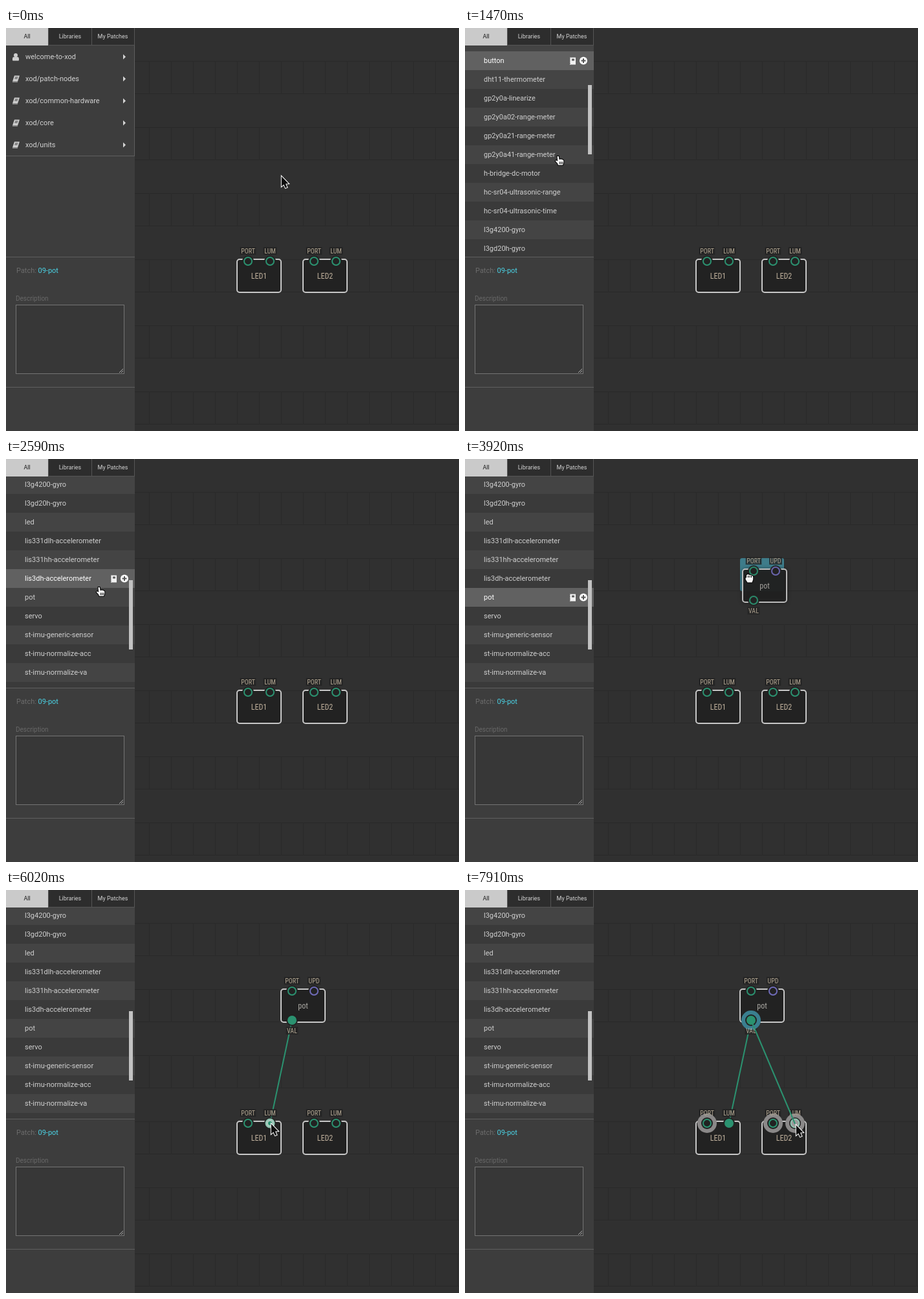
Animation, 700 px wide and 622 px high, one loop 8000 ms. Source, as an HTML page with a canvas:

```html
<!DOCTYPE html>
<html lang="en">
<head>
<meta charset="utf-8">
<title>Patch editor</title>
<style>
html, body { margin: 0; width: 100%; height: 100%; overflow: hidden; background: #303030; }
canvas { display: block; }
</style>
</head>
<body>
<canvas id="stage" width="700" height="622"></canvas>
<script>
const ctx = document.getElementById('stage').getContext('2d');
const LOOP = 8000, STEP = 70;
const GREEN = '#2b9270', PURPLE = '#6f6bb8', DARK = '#222222', LINE = '#5f5f5f';
const SANS = 'Roboto, sans-serif';
const NARROW = '"Roboto Condensed", Roboto, sans-serif';
const ITEMS = ['analog-input', 'analog-sensor', 'button', 'dht11-thermometer', 'gp2y0a-linearize',
  'gp2y0a02-range-meter', 'gp2y0a21-range-meter', 'gp2y0a41-range-meter', 'h-bridge-dc-motor',
  'hc-sr04-ultrasonic-range', 'hc-sr04-ultrasonic-time', 'l3g4200-gyro', 'l3gd20h-gyro', 'led',
  'lis331dlh-accelerometer', 'lis331hh-accelerometer', 'lis3dh-accelerometer', 'pot', 'servo',
  'st-imu-generic-sensor', 'st-imu-normalize-acc', 'st-imu-normalize-va', 'text-lcd-16x2',
  'thermometer-dht21', 'thermometer-tmp36'];
const POT = ITEMS.indexOf('pot'), BUTTON = ITEMS.indexOf('button');
const LIST_TOP = 27, LIST_END = 353, ITEMS_TOP = 129, ROW = 29;

// Moments of the interaction, in ms
const EXPAND = 770, DRAG = 3010, DROP = 4060, PICK1 = 5180, LINK1 = 6020, PICK2 = 7000;
const cursorPath = [
  [70, 425, 228], [630, 180, 118], [700, 180, 118], [1260, 144, 198], [2590, 144, 198],
  [2800, 143, 207], [2940, 143, 207], [3080, 142, 208], [3150, 142, 208], [3430, 226, 226],
  [3920, 437, 178], [4060, 437, 178], [4480, 484, 172], [4830, 471, 155], [5040, 450, 201],
  [5180, 450, 201], [5950, 409, 360], [6020, 409, 360], [6790, 452, 209], [6860, 450, 206],
  [7000, 450, 206], [7910, 511, 362]
];
const scrollPath = [[1260, 0], [1470, 151], [2450, 423]];
const thumbPath = [[0, 29], [151, 88], [423, 187]];

function follow(keys, t, soft = 0) {
  if (t <= keys[0][0]) return keys[0].slice(1);
  for (let i = 1; i < keys.length; i++) {
    const a = keys[i - 1], b = keys[i];
    if (t > b[0]) continue;
    const u = (t - a[0]) / (b[0] - a[0]);
    const v = u + soft * (u * u * (3 - 2 * u) - u);
    return a.slice(1).map((p, k) => p + (b[k + 1] - p) * v);
  }
  return keys[keys.length - 1].slice(1);
}

function box(x, y, w, h, color) {
  ctx.fillStyle = color;
  ctx.fillRect(x, y, w, h);
}
function text(str, x, y, size, color, align = 'left', family = SANS) {
  ctx.font = `${size}px ${family}`;
  ctx.textAlign = align;
  ctx.textBaseline = 'alphabetic';
  ctx.fillStyle = color;
  ctx.fillText(str, x, y + size * 0.355);
}
function disc(x, y, r, fill, stroke, width = 2) {
  ctx.beginPath();
  ctx.arc(x, y, r, 0, Math.PI * 2);
  if (fill) { ctx.fillStyle = fill; ctx.fill(); }
  if (stroke) { ctx.strokeStyle = stroke; ctx.lineWidth = width; ctx.stroke(); }
}
function shape(points, fill, stroke, width = 1) {
  ctx.beginPath();
  points.forEach(([x, y]) => ctx.lineTo(x, y));
  ctx.closePath();
  if (stroke) { ctx.strokeStyle = stroke; ctx.lineWidth = width; ctx.stroke(); }
  ctx.fillStyle = fill;
  ctx.fill();
}
function link(x1, y1, x2, y2) {
  ctx.beginPath();
  ctx.moveTo(x1, y1);
  ctx.lineTo(x2, y2);
  ctx.strokeStyle = GREEN;
  ctx.lineWidth = 2;
  ctx.stroke();
}
function at(x, y, draw) {
  ctx.save();
  ctx.translate(x, y);
  draw();
  ctx.restore();
}

function drawGrid() {
  box(0, 0, 700, 622, '#303030');
  for (let y = 51; y < 622; y += 102) {
    box(199, y, 501, 1, '#292929');
    box(199, y + 50, 501, 1, '#292929');
    for (let x = 221; x < 700; x += 34) box(x, y, 1, 51, '#2a2a2a');
  }
}

function drawPin(x, y, label, labelY, state = {}) {
  const color = state.color || GREEN;
  ctx.font = `10px ${NARROW}`;
  const w = ctx.measureText(label).width + 3;
  box(x - w / 2, labelY - 6, w, 12, 'rgba(36,36,36,.85)');
  if (state.ring) disc(x, y, 15, state.ring);
  text(label, x, labelY, 10, '#b3a793', 'center', NARROW);
  disc(x, y, 9, DARK);
  if (state.hover) {
    disc(x, y, 6.5, state.linked ? '#a9cabe' : '#9c9c9c', '#8fc5b1');
    if (state.linked) disc(x, y, 3, GREEN);
  } else {
    disc(x, y, 6, state.linked ? color : DARK, color);
  }
}

function drawNode(x, y, name, pins, nameColor = '#bfb09c') {
  ctx.beginPath();
  ctx.roundRect(x, y, 68, 51, 4);
  ctx.fillStyle = DARK;
  ctx.fill();
  ctx.shadowColor = 'transparent';
  ctx.strokeStyle = '#c6c6c6';
  ctx.lineWidth = 2;
  ctx.stroke();
  text(name, x + 34, y + 26, 12, nameColor, 'center', NARROW);
  for (const [dx, top, label, state] of pins)
    drawPin(x + dx, y + (top ? 3 : 48), label, y + (top ? -13 : 64), state);
}
function drawPot(x, y, valState) {
  drawNode(x, y, 'pot', [[17, 1, 'PORT'], [51, 1, 'UPD', { color: PURPLE }], [17, 0, 'VAL', valState]], '#acaaa5');
}

function drawPatch(t, cx, cy) {
  const picking = (t >= PICK1 && t < LINK1) || t >= PICK2;
  const linked = t >= LINK1;
  const near = (x, y) => t > DROP && Math.hypot(cx - x, cy - y) < 9.6;
  const ring = picking ? '#8a8888' : null;

  if (t >= DRAG && t < DROP) {
    const sx = 221 + 34 * Math.round((cx - 229) / 34);
    const sy = 153 + 102 * Math.round((cy - 161) / 102);
    ctx.beginPath();
    ctx.roundRect(sx, sy, 68, 51, 3);
    ctx.fillStyle = '#3e7c8a';
    ctx.fill();
  }
  if (linked) link(442, 201, 408, 360);
  drawNode(357, 357, 'LED1', [
    [17, 1, 'PORT', { ring }],
    [51, 1, 'LUM', { ring: linked ? null : ring, linked, hover: near(408, 360) }]]);
  drawNode(459, 357, 'LED2', [
    [17, 1, 'PORT', { ring }],
    [51, 1, 'LUM', { ring, hover: near(510, 360) }]]);
  if (t >= DROP) {
    drawPot(425, 153, {
      ring: picking ? '#3a7f8f' : null, linked,
      hover: near(442, 201) || (cx === 450 && cy < 207)
    });
  }
  if (picking) link(442, 201, cx - 1, cy - 1);
}

function drawBook(x, y) {
  at(x, y, () => {
    shape([[-2, -5], [6, -5], [3, 4], [-5, 4]], '#cfcfcf');
    shape([[-5, 4], [3, 4], [3, 5.5], [-5, 5.5]], '#8a8a8a');
    link2([[-1, -2.5], [3.5, -2.5]]);
    link2([[-1.7, -0.5], [2.8, -0.5]]);
  });
}
function link2([[x1, y1], [x2, y2]]) {
  ctx.beginPath();
  ctx.moveTo(x1, y1);
  ctx.lineTo(x2, y2);
  ctx.strokeStyle = '#3d3d3d';
  ctx.lineWidth = 1;
  ctx.stroke();
}
function drawUser(x, y) {
  disc(x, y - 2.5, 3, '#cfcfcf');
  ctx.beginPath();
  ctx.roundRect(x - 5, y, 10, 6, [3, 3, 1, 1]);
  ctx.fill();
}

function drawHeading(name, y, open) {
  box(0, y, 198, 34, '#3d3d3d');
  box(0, y + 34, 198, 1, LINE);
  const mid = y + 17.5;
  if (name === 'welcome-to-xod') drawUser(15, mid); else drawBook(15, mid);
  text(name, 30, mid, 11, '#d2d2d2');
  shape(open ? [[179, mid - 2], [187, mid - 2], [183, mid + 3]]
             : [[181, mid - 4], [185, mid], [181, mid + 4]], '#d6d6d6');
}

function drawItem(i, y, hovered) {
  box(0, y, 199, ROW, hovered ? '#616161' : i % 2 ? '#444444' : '#3a3a3a');
  const mid = y + 14.5;
  text(ITEMS[i], 29, mid, 11, hovered ? '#ffffff' : '#cfcfcf');
  if (!hovered) return;
  box(162, mid - 5, 9, 11, '#f2f2f2');
  for (let k = 0; k < 4; k++) box(161, mid - 4 + k * 2.5, 2, 1, '#616161');
  box(165, mid - 3, 4, 3, '#616161');
  disc(183, mid, 6, '#ffffff');
  box(179.5, mid - 1, 7, 2, '#555');
  box(182, mid - 3.5, 2, 7, '#555');
}

function hoveredItem(t, cx, cy, scroll) {
  if (t >= DRAG && t < DROP) return POT;
  if (t < EXPAND || cx > 199) return -1;
  if (t >= 1260 && t < 1610) return BUTTON;
  return Math.floor((cy + scroll - ITEMS_TOP) / ROW);
}

function drawList(t, cx, cy) {
  const open = t >= EXPAND;
  const [scroll] = follow(scrollPath, t);
  ctx.save();
  ctx.beginPath();
  ctx.rect(0, LIST_TOP, 199, LIST_END - LIST_TOP);
  ctx.clip();
  ['welcome-to-xod', 'xod/patch-nodes', 'xod/common-hardware'].forEach((name, i) =>
    drawHeading(name, LIST_TOP + i * 34 - scroll, open && i === 2));
  let y = ITEMS_TOP;
  if (open) {
    const hovered = hoveredItem(t, cx, cy, scroll);
    ITEMS.forEach((_, i) => drawItem(i, ITEMS_TOP + i * ROW - scroll, i === hovered));
    y += ITEMS.length * ROW;
  }
  drawHeading('xod/core', y - scroll, false);
  drawHeading('xod/units', y + 34 - scroll, false);
  if (open) box(190, follow(thumbPath, scroll)[0], 6, 107, '#c2c2c2');
  else box(198, LIST_TOP, 1, 171, LINE);
  ctx.restore();
}

function drawSidebar(t, cx, cy) {
  box(0, 0, 199, 622, '#3d3d3d');
  drawList(t, cx, cy);

  box(0, 0, 199, 27, '#2d2d2d');
  box(0, 0, 65, 27, '#cacaca');
  [65, 132, 198].forEach(x => box(x, 0, 1, 27, '#555555'));
  box(65, 26, 134, 1, '#555555');
  text('All', 32.5, 13, 9, '#1c1c1c', 'center');
  text('Libraries', 99, 13, 9, '#d2d2d2', 'center');
  text('My Patches', 165, 13, 9, '#d2d2d2', 'center');

  box(0, 353, 199, 1, LINE);
  box(0, 554, 199, 1, LINE);
  text('Patch:', 16, 374.5, 11, '#6c6c6c');
  text('09-pot', 49.5, 374.5, 11, '#4bd3e6');
  text('Description', 15, 417.5, 10, '#686868');
  box(15, 427, 168, 107, '#747474');
  box(16, 428, 166, 105, '#373737');
  ctx.strokeStyle = '#b0b0b0';
  ctx.lineWidth = 1;
  ctx.beginPath();
  [6, 3].forEach(d => { ctx.moveTo(181 - d, 532); ctx.lineTo(181, 532 - d); });
  ctx.stroke();
}

function drawArrow() {
  shape([[.8, 1], [.8, 16.5], [4.3, 13.4], [6.8, 19], [9.4, 17.9], [7, 12.4], [11.6, 12.2]],
    '#0c0c0c', '#ffffff', 2);
}
function drawHand() {
  shape([[-1.5, 0], [.8, 0], [1.6, 5], [4, 4.4], [6.5, 5], [8.4, 6.5], [8.4, 10.5], [7, 13.5],
    [0, 13.5], [-1, 11], [-4.2, 7.6], [-3.4, 6.2], [-.8, 7.4]], '#f6f6f6', '#000000', 2);
  [2, 4.2, 6.4].forEach(x => box(x, 8.5, 1, 3.5, '#000000'));
}
function drawFist() {
  shape([[-2, 1], [0, 0], [3, 1], [6, 1.4], [8.2, 3.5], [8.2, 8], [6.6, 12.5], [-.5, 12.5],
    [-3.4, 8], [-3.4, 5.5], [-2, 5]], '#f6f6f6', '#000000', 2);
  [0, 2.5, 5].forEach(x => box(x, 2, 1, 3, '#000000'));
}

function drawScene(t) {
  const [cx, cy] = follow(cursorPath, t, 0.5);
  const dragging = t >= DRAG && t < DROP;
  drawGrid();
  drawPatch(t, cx, cy);
  drawSidebar(t, cx, cy);
  if (dragging) {
    ctx.save();
    ctx.globalAlpha = 0.93;
    ctx.shadowColor = 'rgba(0,0,0,.6)';
    ctx.shadowBlur = 6;
    drawPot(Math.round(cx - 8), Math.round(cy - 8));
    ctx.restore();
  }
  at(Math.round(cx), Math.round(cy), dragging ? drawFist : cx < 199 ? drawHand : drawArrow);
}

const start = performance.now();
function tick() {
  const t = (performance.now() - start) % LOOP;
  drawScene(Math.min(Math.floor(t / STEP) * STEP, 7910));
  requestAnimationFrame(tick);
}
tick();
</script>
</body>
</html>
```
